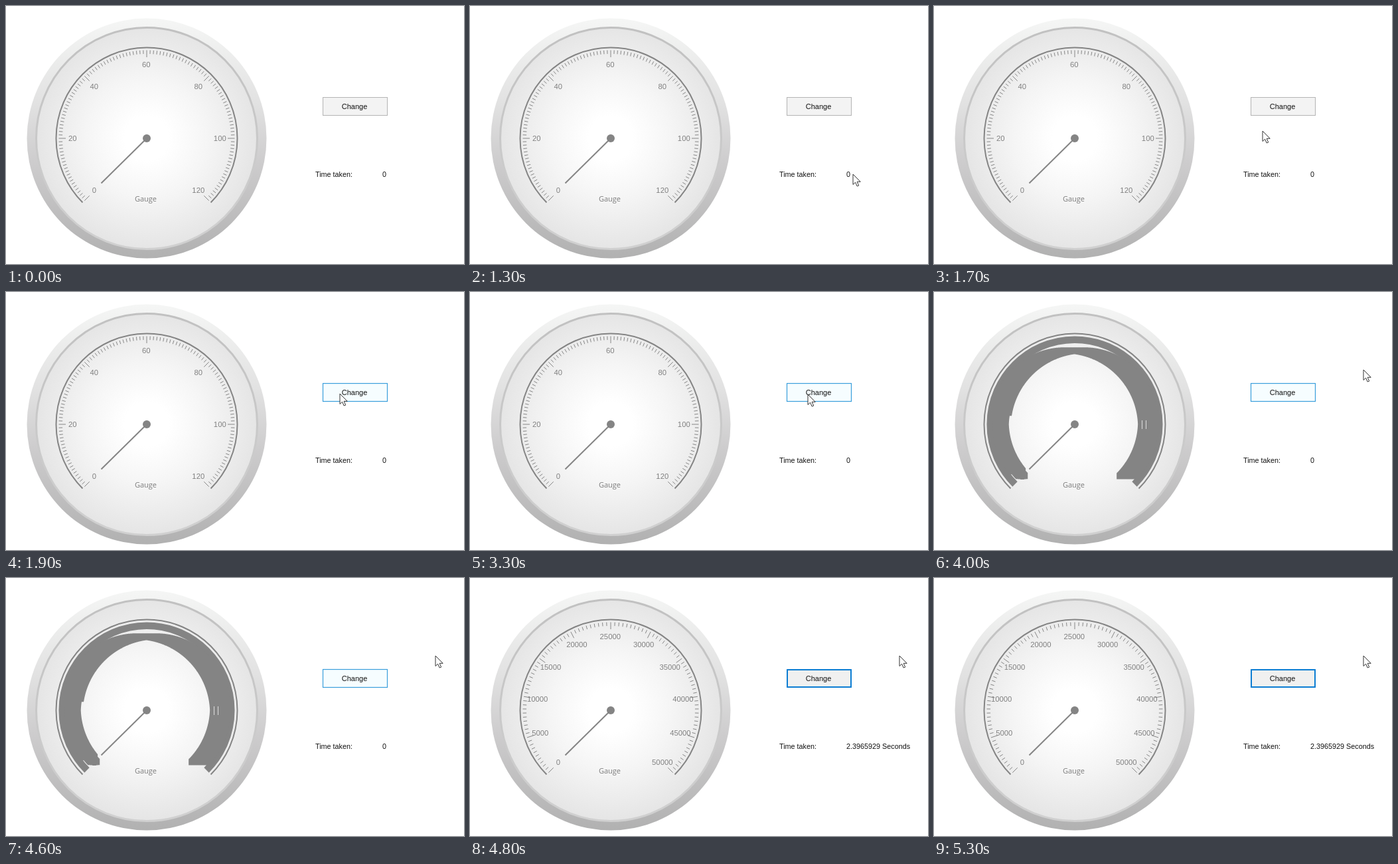
These frames come from a looping animation (690x388 px, 7.7 s). An HTML page:

```html
<!DOCTYPE html>
<html lang="en">
<head>
<meta charset="utf-8">
<title>Gauge range change</title>
<style>
  html, body { margin: 0; width: 100%; height: 100%; overflow: hidden; background: #fff; }
  svg { display: block; width: 100vw; height: 100vh; }
  text { font: 11px "Liberation Sans", Arial, sans-serif; fill: #111; }
  .scale text { font-size: 11.3px; fill: #808080; text-anchor: middle; }
  .scale path { stroke: #868686; stroke-width: 1; }
  .title { font: 11px "Open Sans", sans-serif; fill: #7c7c7c; }
</style>
</head>
<body>
<svg viewBox="0 0 690 388">
  <defs>
    <linearGradient id="rim" x1="0" y1="0" x2="0" y2="1">
      <stop offset="0" stop-color="#f5f6f5"/>
      <stop offset=".35" stop-color="#e2e2e2"/>
      <stop offset=".6" stop-color="#cdcccd"/>
      <stop offset="1" stop-color="#b1b1b1"/>
    </linearGradient>
    <linearGradient id="ring" x1="0" y1="0" x2="0" y2="1">
      <stop offset="0" stop-color="#c1c1c1"/>
      <stop offset="1" stop-color="#d0d0d0"/>
    </linearGradient>
    <radialGradient id="face">
      <stop offset=".2" stop-color="#fff"/>
      <stop offset=".55" stop-color="#f5f5f5"/>
      <stop offset="1" stop-color="#e5e5e5"/>
    </radialGradient>
  </defs>

  <circle cx="212" cy="199" r="180.5" fill="url(#rim)"/>
  <circle cx="212" cy="199" r="166.5" fill="url(#face)" stroke="url(#ring)" stroke-width="3"/>
  <path id="arc" fill="none" stroke="#848484" stroke-width="2"/>

  <g id="small" class="scale"></g>
  <g id="large" class="scale"></g>
  <g id="busy">
    <path id="tickBand" fill="none" stroke="#848484" stroke-width="10.5"/>
    <path id="labelBand" fill="#848484"/>
    <path d="M313.5 193V206M319.5 193V206" stroke="#ddd"/>
  </g>

  <path d="M212 199L143.5 266.5" stroke="#848484" stroke-width="2"/>
  <circle cx="212" cy="199" r="6" fill="#848484"/>
  <text class="title" x="210.5" y="294" text-anchor="middle">Gauge</text>

  <rect id="button"/>
  <text x="525" y="155.3" text-anchor="middle">Change</text>
  <text x="466" y="257.3" style="font-size:10.8px">Time taken:</text>
  <text id="elapsed" x="567" y="257.3" style="font-size:10.8px"></text>

  <path id="cursor" d="M0 0V15.5L3.6 12.2 6.2 18 8.7 17 6.2 11.3H11.2Z" fill="#fff" stroke="#333"/>
</svg>
<script>
const LOOP = 7700, STEP = 100;
const CX = 212, CY = 199, START = 135, SWEEP = 270;
const LABEL_R = 111;
const $ = id => document.getElementById(id);

function polar(r, deg) {
  const a = deg * Math.PI / 180;
  return [CX + r * Math.cos(a), CY + r * Math.sin(a)];
}

function arcPath(r) {
  return `M${polar(r, START)}A${r} ${r} 0 1 1 ${polar(r, START + SWEEP)}`;
}

function scaleMarkup(max, interval, minorsPerMajor) {
  const count = max / interval * minorsPerMajor;
  let ticks = '', labels = '';
  for (let i = 0; i <= count; i++) {
    const angle = START + SWEEP * i / count;
    const major = i % minorsPerMajor === 0;
    ticks += `M${polar(132.5, angle)}L${polar(major ? 122 : 127, angle)}`;
    if (major) {
      const [x, y] = polar(LABEL_R, angle);
      labels += `<text x="${x - 0.7}" y="${y + 4}">${i / minorsPerMajor * interval}</text>`;
    }
  }
  return `<path d="${ticks}"/>${labels}`;
}

// Every label of a one-unit scale overlaps its neighbours and forms a solid band.
function labelSweep(max) {
  let d = '';
  for (let a = 0; a <= SWEEP; a += 0.3) {
    const digits = String(Math.round(max * a / SWEEP)).length;
    const width = digits * 6.2 - 0.5;
    const [x, y] = polar(LABEL_R, START + a);
    d += `M${x - 0.5 - width / 2} ${y - 4.8}h${width}v9.3h${-width}z`;
  }
  return d;
}

const approach = [[577, 253], [562, 252], [537, 248], [497, 222], [495, 188], [500, 160], [503, 153]];
const leave = [[509, 154], [548, 153], [590, 146], [624, 127], [647, 117]];

function cursorAt(t) {
  const [path, begin] = t < 3300 ? [approach, 1300] : [leave, 3300];
  const step = Math.floor((t - begin) / STEP);
  return path[Math.max(0, Math.min(step, path.length - 1))];
}

const buttonStyles = {
  idle: { x: 477.5, y: 137.5, width: 97, height: 27, fill: '#f3f3f3', stroke: '#b4b4b4', 'stroke-width': 1 },
  hover: { x: 477.5, y: 137.5, width: 97, height: 27, fill: '#f6fdff', stroke: '#3a9edb', 'stroke-width': 1.2 },
  focus: { x: 478, y: 138, width: 96, height: 26, fill: '#f0f0f0', stroke: '#0c7dd3', 'stroke-width': 2 }
};

function setAttributes(node, values) {
  for (const name in values) node.setAttribute(name, values[name]);
}

function show(id, visible) {
  $(id).style.display = visible ? '' : 'none';
}

function render(t) {
  const done = t >= 4800;
  show('small', t < 4000);
  show('busy', t >= 4000 && !done);
  show('large', done);
  show('cursor', t >= 1300);
  $('cursor').setAttribute('transform', `translate(${cursorAt(t)})`);
  setAttributes($('button'), buttonStyles[done ? 'focus' : t >= 1800 ? 'hover' : 'idle']);
  $('elapsed').textContent = done ? '2.3965929 Seconds' : '0';
}

$('arc').setAttribute('d', arcPath(136.5));
$('tickBand').setAttribute('d', arcPath(127.3));
$('labelBand').setAttribute('d', labelSweep(50000));
$('small').innerHTML = scaleMarkup(120, 20, 20);
$('large').innerHTML = scaleMarkup(50000, 5000, 10);

const origin = performance.now();
function frame() {
  render((performance.now() - origin) % LOOP);
  requestAnimationFrame(frame);
}
frame();
</script>
</body>
</html>
```
